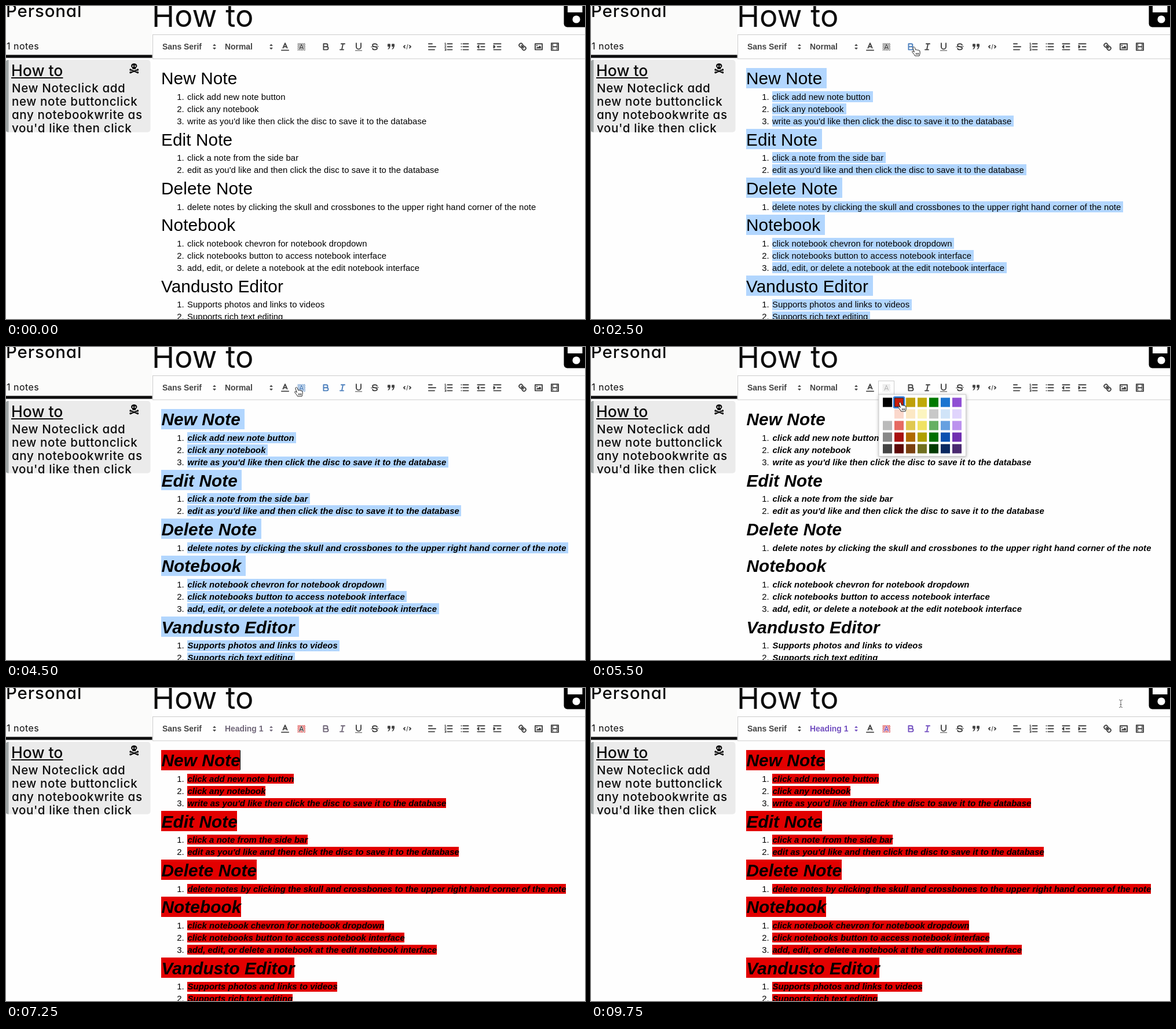
Recreate the animation shown at these times as an HTML page with a canvas. Size 1000 by 540 pixels, loop 10 s.

```html
<!DOCTYPE html>
<html lang="en">
<head>
<meta charset="utf-8">
<title>Notebook</title>
<style>
  html, body { margin: 0; width: 100%; height: 100%; overflow: hidden; background: #fefefe; }
  #stage { position: relative; width: 1000px; height: 540px; overflow: hidden; }
  canvas { position: absolute; left: 0; top: 0; }
  .t {
    position: absolute; margin: 0; white-space: pre; color: #0c0c0c; line-height: 1; font-weight: 450;
    font-family: Inter, Lato, sans-serif; font-feature-settings: "cv11"; letter-spacing: .03em;
  }
  #book { left: 0; top: -6px; font-size: 29.4px; }
  #count { left: 1px; top: 61px; font-size: 16px; font-weight: 400; }
  #title { left: 252px; top: -9.5px; font-size: 52.5px; font-weight: 400; letter-spacing: 0; }
  #name {
    left: 9px; top: 97.8px; font-size: 26.6px; letter-spacing: 0;
    text-decoration: underline 2px; text-underline-offset: 2px;
  }
  #text { left: 10px; top: 131px; height: 86.5px; overflow: hidden; font-size: 20.57px; line-height: 22.93px; }
</style>
</head>
<body>
<div id="stage">
  <canvas id="view" width="1000" height="540"></canvas>
  <div class="t" id="book">Personal</div>
  <div class="t" id="count">1 notes</div>
  <div class="t" id="title">How to</div>
  <div class="t" id="name">How to</div>
  <div class="t" id="text">New Noteclick add
new note buttonclick
any notebookwrite as
you'd like then click</div>
  <canvas id="top" width="1000" height="540"></canvas>
</div>
<script>
const LOOP = 10000, STEP = 250;
const INK = '#444', BLUE = '#4d80bd', RED = '#e20000', SELECT = 'rgba(128,188,255,.6)';
const FACE = '"Liberation Sans", Arial, Helvetica, sans-serif';
const view = document.getElementById('view').getContext('2d');
const over = document.getElementById('top').getContext('2d');
let c = view;

const guide = [
  ['New Note', 'click add new note button', 'click any notebook',
    "write as you'd like then click the disc to save it to the database"],
  ['Edit Note', 'click a note from the side bar',
    "edit as you'd like and then click the disc to save it to the database"],
  ['Delete Note',
    'delete notes by clicking the skull and crossbones to the upper right hand corner of the note'],
  ['Notebook', 'click notebook chevron for notebook dropdown',
    'click notebooks button to access notebook interface',
    'add, edit, or delete a notebook at the edit notebook interface'],
  ['Vandusto Editor', 'Supports photos and links to videos', 'Supports rich text editing']
];

const swatches = [
  '000 c81c0a bfa008 bfa90a 007a00 1a74d0 9050d4',
  'fff fbd8cc fce8c4 fcf5c0 c8c8c8 d0e4f8 e0d4fc',
  'bbb e66a62 e0c850 f0e262 66b062 66a0e0 bc92ee',
  '888 a81010 b06a00 b0a000 007000 0a50b0 7030b0',
  '444 5c0808 7a4010 707020 003a00 0a2860 4a2a70'
].map(row => row.split(' '));

// Each icon lives on an 18 unit square: s = 2 unit stroke, e = 1 unit stroke, f = fill.
const icons = {
  color: { s: 'M5.5 11L9 3L12.5 11M11.6 9H6.4M3 15H15' },
  bold: { s: 'M5 4H9.5A2.5 2.5 0 0 1 9.5 9H5ZM5 9H10.5A2.5 2.5 0 0 1 10.5 14H5Z' },
  italic: { s: 'M7 4H13M5 14H11M8 14L10 4' },
  underline: { s: 'M5 3V9A4 4 0 0 0 13 9V3', f: 'M3 15H15V16H3Z' },
  strike: { s: 'M12.9 6C12.4 4.7 10.9 4 9 4C6.8 4 5 5 5 6.5C5 8 6.2 8.5 9 9C11.8 9.4 13 10 13 11.5C13 13 11.2 14 9 14C7.1 14 5.6 13.3 5.1 12', e: 'M2.5 9.5L15.5 8.5' },
  quote: { s: 'M4 5H7V8H4ZM11 5H14V8H11Z', e: 'M7 8Q7 12 4 13M14 8Q14 12 11 13', f: 'M4 5H7V8Q7 12 4 13L6 8H4ZM11 5H14V8Q14 12 11 13L13 8H11Z' },
  code: { s: 'M5 7L3 9L5 11M13 7L15 9L13 11', e: 'M10 5L8 13' },
  align: { s: 'M3 4H9M3 9H15M3 14H13' },
  ordered: { s: 'M7 4H15M7 9H15M7 14H15', e: 'M2.5 3.2L3.5 2.5V5.5M2.5 5.5H4.5M2.5 7.5H4.3L2.5 10.5H4.5M2.5 12.5H4.5V15.5H2.5M3 14H4.5' },
  bullet: { s: 'M6 4H15M6 9H15M6 14H15M3 4H3.01M3 9H3.01M3 14H3.01' },
  outdent: { s: 'M3 4H15M9 9H15M3 14H15M5 7V11L3 9Z' },
  indent: { s: 'M3 4H15M9 9H15M3 14H15M3 7V11L5 9Z', f: 'M3 7V11L5 9Z' },
  link: { s: 'M7 7L11 11M8.9 4.6A3.5 3.5 0 0 1 9.2 9.2A3.5 3.5 0 0 1 4.6 8.9C3.2 7.5 2 6.4 4.2 4.2S7.5 3.2 8.9 4.6ZM13.4 9.1A3.5 3.5 0 0 0 8.8 8.8A3.5 3.5 0 0 0 9.1 13.4C10.5 14.8 11.6 16 13.8 13.8S14.8 10.5 13.4 9.1Z' },
  image: { s: 'M3 4H15V14H3Z', f: 'M5 6H7V8H5ZM5 12V11L7 9L8 10L11 7L13 9V12Z' },
  video: { s: 'M3 3H15V15H3Z', f: 'M5 3H6V15H5ZM12 3H13V15H12ZM5 8H13V10H5ZM3 5H6V6H3ZM3 8H6V9H3ZM3 11H6V12H3ZM12 5H15V6H12ZM12 8H15V9H12ZM12 11H15V12H12Z' },
  arrows: { e: 'M7 11L9 13L11 11ZM7 7L9 5L11 7Z', f: 'M7 11L9 13L11 11ZM7 7L9 5L11 7Z' }
};
const paths = {};
for (const name in icons) {
  paths[name] = Object.entries(icons[name]).map(([kind, d]) => [kind, new Path2D(d)]);
}
const plain = [['underline', 609], ['strike', 637], ['quote', 665], ['code', 693], ['align', 736],
  ['ordered', 764.5], ['bullet', 792.5], ['outdent', 820.5], ['indent', 848.5],
  ['link', 892], ['image', 920], ['video', 948]];

// time, x, y, pointer shape
const track = [
  [250, 452, 165, 'beam'], [750, 404, 128, 'beam'], [1500, 404, 128, 'hand'],
  [2500, 560, 77, 'hand'], [3000, 560, 77, 'hand'], [3250, 586, 77, 'hand'], [3750, 586, 77, 'hand'],
  [4500, 504, 76, 'hand'], [4750, 504, 76, 'hand'], [5500, 536, 102, 'hand'],
  [5750, 536, 102, 'beam'], [6250, 505, 131, 'beam'], [6500, 505, 131, ''],
  [9250, 980, 24, 'hand'], [9500, 948, 26, 'beam'], [9750, 915, 27, 'beam'], [LOOP, 915, 27, '']
];

function box(x, y, w, h, color) {
  c.fillStyle = color;
  c.fillRect(x, y, w, h);
}

function disc(x, y, r, color) {
  c.fillStyle = color;
  c.beginPath();
  c.arc(x, y, r, 0, 7);
  c.fill();
}

function label(text, x, y, font, color, gap = 0) {
  c.font = font + ' ' + FACE;
  c.letterSpacing = gap + 'px';
  c.fillStyle = color;
  c.fillText(text, x, y);
}

function icon(name, x, color = INK) {
  c.save();
  c.translate(x, 70.3);
  c.scale(1.01, 1.01);
  c.translate(-9, -9);
  c.strokeStyle = c.fillStyle = color;
  c.lineCap = c.lineJoin = 'round';
  for (const [kind, path] of paths[name]) {
    c.lineWidth = kind === 's' ? 1.9 : 1;
    if (kind === 'f') c.fill(path); else c.stroke(path);
  }
  c.restore();
}

function marker(color, hatch) {
  c.save();
  c.beginPath();
  c.rect(503.5, 64, 13.5, 13);
  c.clip();
  c.strokeStyle = hatch;
  c.lineWidth = 1.1;
  c.beginPath();
  for (let x = 490; x < 518; x += 3) {
    c.moveTo(x, 78);
    c.lineTo(x + 15, 63);
  }
  c.stroke();
  c.lineJoin = 'round';
  for (const [w, col] of [[2.6, '#fefefe'], [1.4, color]]) {
    c.lineWidth = w;
    c.strokeStyle = col;
    c.stroke(new Path2D('M506.8 74.5L510.2 66L513.6 74.5M508 72H512.4'));
  }
  c.restore();
}

function skull() {
  c.strokeStyle = '#0c0c0c';
  c.lineWidth = 2.4;
  c.lineCap = 'round';
  c.stroke(new Path2D('M215 110L227.5 114.8M227.5 110L215 114.8'));
  for (const x of [215, 227.5]) for (const y of [110, 114.8]) disc(x, y, 1.7, '#0c0c0c');
  c.beginPath();
  c.ellipse(221.2, 103.3, 5.2, 4.3, 0, 0, 7);
  c.fill();
  box(218.3, 104, 5.8, 5, '#0c0c0c');
  disc(219.2, 103.8, 1.2, '#eee');
  disc(223.2, 103.8, 1.2, '#eee');
}

function frame() {
  box(0, 0, 1000, 540, '#fefefe');
  box(0, 0, 252, 85, '#fbfbfa');
  box(0, 84.3, 252.5, 5.2, '#0f0f0f');
  c.save();
  c.beginPath();
  c.roundRect(-1, 93, 250.5, 124.7, 5);
  c.clip();
  box(0, 93, 250, 125, '#ebebeb');
  box(0, 93, 4.5, 125, '#a0a6a6');
  c.restore();
  skull();
  c.strokeStyle = '#ccc';
  c.lineWidth = 1;
  c.strokeRect(253.5, 49.5, 760, 41.5);
  c.fillStyle = '#000';
  c.beginPath();
  c.roundRect(963.5, -20, 60, 56.5, 6);
  c.fill();
  box(970, -2, 25.5, 13, '#fefefe');
  disc(985, 23, 6.6, '#fefefe');
}

function toolbar(s) {
  label('Sans Serif', 270, 75.3, 'bold 13.9px', INK);
  icon('arrows', 360);
  label(s.head ? 'Heading 1' : 'Normal', 378, 75.3, 'bold 13.9px', s.headColor);
  icon('arrows', 458, s.headColor);
  icon('color', 482);
  marker(s.markColor, s.hatch);
  icon('bold', 552.5, s.boldColor);
  icon('italic', 581, s.italicColor);
  for (const [name, x] of plain) icon(name, x);
}

function line(text, x, y, size, s) {
  const big = size > 20;
  const font = (s.italic ? 'italic ' : '') + (s.bold ? 'bold ' : '') + size + 'px';
  const gap = big ? .12 : .08;
  c.font = font + ' ' + FACE;
  c.letterSpacing = gap + 'px';
  const w = c.measureText(text).width;
  const left = Math.floor(x), top = Math.round(y - (big ? 18 : 8.3)), h = big ? 35 : 17;
  if (s.red) box(left, top, Math.round(w), h, RED);
  if (s.select) box(left, top - (big ? 0 : 1), Math.round(w + (big ? 8 : 4)), h + (big ? 0 : 2), SELECT);
  label(text, x + (s.italic ? .5 : 0), y + (big ? 10.5 : 5.5), font, '#000', gap);
  return w;
}

function editor(s) {
  let y = 103.4;
  guide.forEach(([head, ...items], g) => {
    const w = line(head, 268, y + 21.1, 29.714, s);
    if (!g && s.caret) box(Math.round(268 + w), y + 4, 1, 34, '#000');
    y += 42.2;
    items.forEach((item, i) => {
      label(i + 1 + '.', 295.2, y + 16.05, '14.857px', '#000', .08);
      line(item, 313, y + 10.55, 14.857, s);
      y += 21.1;
    });
  });
}

function picker() {
  c.strokeStyle = '#ccc';
  c.lineWidth = 1;
  c.strokeRect(496.5, 58.5, 27, 24);
  c.save();
  c.shadowColor = 'rgba(0,0,0,.3)';
  c.shadowBlur = 6;
  c.shadowOffsetY = 1;
  box(497, 82, 151, 107, '#fff');
  c.restore();
  c.strokeRect(497, 82, 150.5, 106.5);
  swatches.forEach((row, j) => row.forEach((col, i) => box(504 + i * 20, 87.5 + j * 20, 16, 16, '#' + col)));
}

function focusRing() {
  c.strokeStyle = '#3f86e0';
  c.lineWidth = 3;
  c.beginPath();
  c.roundRect(523, 86.5, 18, 18, 2);
  c.stroke();
  c.strokeStyle = '#222';
  c.lineWidth = 1;
  c.strokeRect(524.5, 88, 15, 15);
}

function pointer(t) {
  let i = track.length - 1;
  while (i >= 0 && track[i][0] > t) i--;
  if (i < 0 || !track[i][3]) return;
  const [t0, x0, y0, shape] = track[i], [t1, x1, y1] = track[i + 1];
  const k = (t - t0) / (t1 - t0), e = k * k * (3 - 2 * k);
  c.save();
  c.translate(x0 + (x1 - x0) * e, y0 + (y1 - y0) * e);
  c.lineWidth = 1;
  c.lineJoin = 'round';
  if (shape === 'beam') {
    c.strokeStyle = '#666';
    c.stroke(new Path2D('M-3 -6.5Q0 -6.5 0 -5V5Q0 6.5 -3 6.5M3 -6.5Q0 -6.5 0 -5M0 5Q0 6.5 3 6.5M-1.5 1.5H1.5'));
  } else {
    const hand = new Path2D('M-3.5 -6Q-2 -7.5 -1 -5.5L1 -1Q2.5 -2.5 3.7 -.8Q5.2 -2 6.2 -.2Q7.6 -1 8 1L8.2 4Q8 6.5 7 9H-.5Q-1.5 6.5 -4 4Q-6.5 1 -4.5 .8Q-3 .8 -1.6 2.5L-4 -4Q-4.2 -5.4 -3.5 -6Z');
    c.fillStyle = '#fff';
    c.fill(hand);
    c.strokeStyle = '#222';
    c.stroke(hand);
    c.stroke(new Path2D('M1.5 4V7M3.6 4V7M5.6 4V7'));
  }
  c.restore();
}

function state(t) {
  const during = (a, b) => t >= a && t < b;
  const open = during(4750, 5750), red = t >= 5750, late = t >= 9250;
  const early = during(500, 1500), head = early || t >= 6500;
  const dim = late ? '#7350c0' : '#6f6678';
  const active = during(5750, 6250) ? BLUE : t >= 6250 ? dim : INK;
  const hover = during(4500, 4750);
  return {
    open, red, head,
    bold: t >= 2750,
    italic: t >= 3250,
    select: during(1500, 4750) || during(5750, 6250),
    caret: (t >= 6250 || early) && t % 1000 >= 250 && t % 1000 < 750,
    headColor: early ? BLUE : head ? dim : INK,
    boldColor: during(2500, 4750) ? BLUE : active,
    italicColor: during(3250, 4750) ? BLUE : active,
    markColor: open ? '#bbb' : hover ? BLUE : late ? '#7350c0' : INK,
    hatch: open ? '#ddd' : hover ? '#5f90c8' : red ? '#d83030' : '#666'
  };
}

function draw(now) {
  const t = Math.floor(now % LOOP / STEP) * STEP;
  const s = state(t);
  c = view;
  frame();
  toolbar(s);
  editor(s);
  c = over;
  c.clearRect(0, 0, 1000, 540);
  if (s.open) picker();
  if (s.open && t >= 5250) focusRing();
  pointer(t);
}

const start = performance.now();
function tick() {
  draw(performance.now() - start);
  requestAnimationFrame(tick);
}
tick();
</script>
</body>
</html>
```
